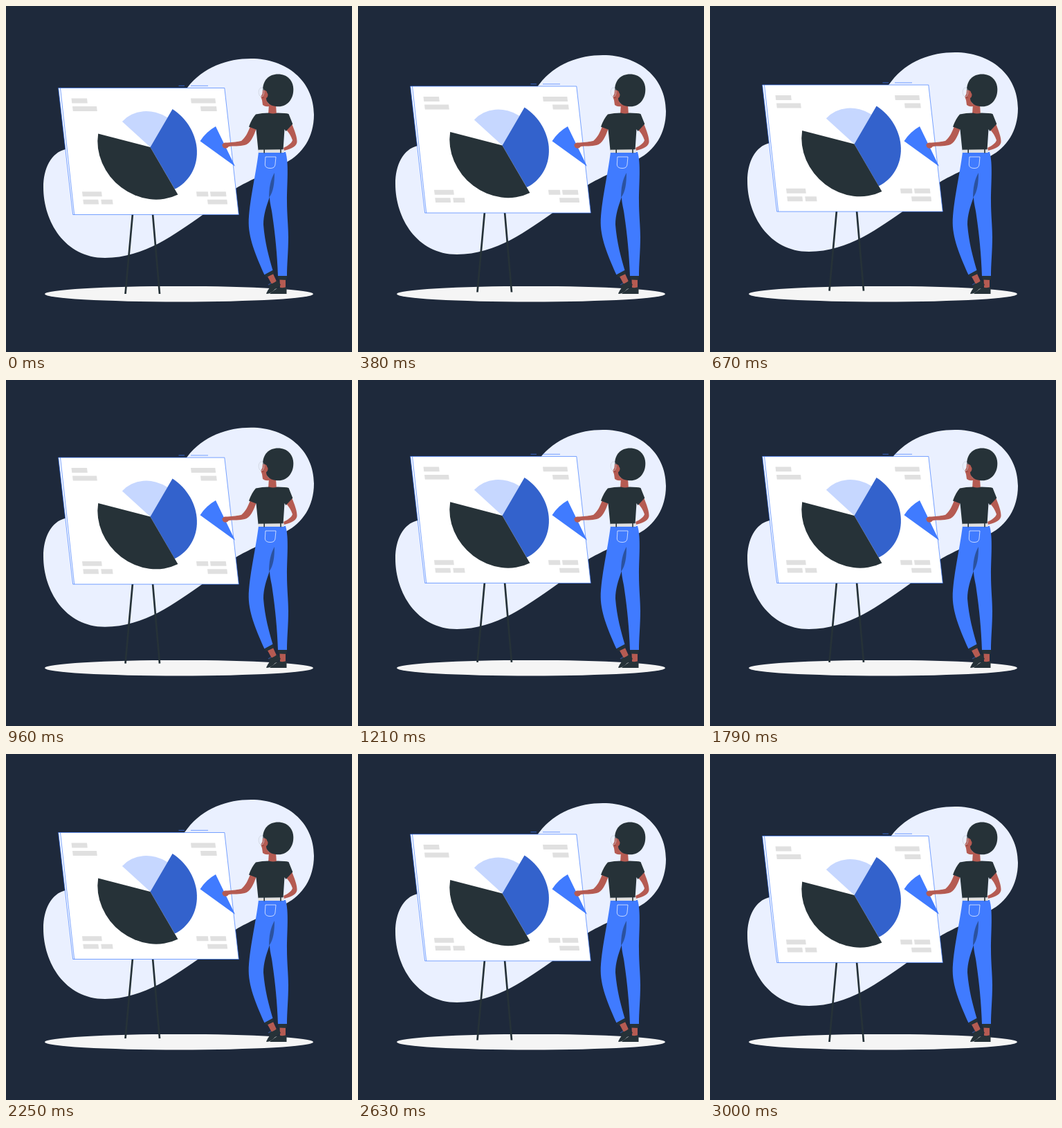
Recreate the animation shown at these times as an HTML page. Size 500 px wide and 500 px high, loop 3040 ms.

```html
<!DOCTYPE html>
<html lang="en">
<head>
<meta charset="utf-8">
<title>Presentation</title>
<style>
  html, body { margin: 0; width: 100%; height: 100%; overflow: hidden; background: #1e293b; }
  svg { display: block; width: 100%; height: 100%; }
  .ink { fill: #263238; }
  .skin { fill: #b55b52; }
  .blue { fill: #407bff; }
  .edge { fill: none; stroke: #407bff; stroke-width: .7; }
</style>
</head>
<body>
<svg viewBox="0 0 500 500">
  <path id="blob" fill="#eaf0ff" d="M262 118C285 88 320 76 354 76C405 76 445 108 445 157C445 190 428 214 405 226C375 242 348 254 333 263C315 275 300 291 284 302C245 329 200 364 143 364C85 364 54 311 54 262C54 235 65 212 86 207C130 195 200 215 236 160C245 146 251 131 262 118Z"/>
  <ellipse cx="250" cy="416.2" rx="194" ry="11.3" fill="#f5f5f5"/>

  <g id="board">
    <path d="M183 300L172.5 416M212 300L222 416" fill="none" stroke="#263238" stroke-width="2.7"/>
    <path class="edge" d="M249.5 115.3H258M267 115.3H292"/>
    <path d="M75.7 118.5H315.8L336.3 301.5H96.7Z" fill="#fff"/>
    <path class="edge" d="M75.7 118.5H315.8L336.3 301.5H96.7ZM78.5 118.5L98.7 301.5"/>
    <g id="labels" fill="#e0e0e0"></g>
    <g id="pie" transform="matrix(1 0 .112 1 208.5 204)"></g>
  </g>

  <path class="blue" d="M331 231.8L280.5 195.3A63 63 0 0 1 303 174Z"/>

  <g id="woman">
    <path class="skin" d="M380 141L390 143L391 157H379Z"/>
    <path class="ink" d="M371 122C371 107 380 98.5 393 98.5C407 98.5 415.3 108 415.3 121C415.3 135 406 145.3 394 145.3C386 145.3 380 143 376 137Z"/>
    <path class="skin" d="M371 121.5Q377 121 377.5 126C379 126 379 132 376 133C376 138 379 141 383 144Q376 147 371 143L370 136L368.2 131L370.5 127Z"/>
    <ellipse cx="369" cy="124.5" rx="3.8" ry="6.5" fill="none" stroke="#c9ced8" stroke-width=".7"/>
    <path d="M370 132.5H373" stroke="#8e3d38" stroke-width=".8"/>

    <path class="skin" d="M353 174L361.5 178C357 190 353 199 345 201C338 203 328 202 322 203C319 207 314 206 313 203C311 199 315 197 320 197.5C328 197 336 196 340 195C346 190 349 184 353 174Z"/>
    <path class="skin" d="M413 170C417 180 421 190 420.5 197C419 205 408 207 402 209L401 205C406 203 413 198 414 194C412 188 409 183 405 179Z"/>
    <path class="ink" d="M361 156.5Q370 154.5 380 154.5Q386 156.5 392 154.5Q404 154.5 408.5 156L414.3 170.5L404.5 181L402.5 178L400.5 208.5H364.5L361.5 178.5L351 174.5Q355 163 361 156.5Z"/>

    <path class="blue" d="M365 211H404C409 228 406 256 406 282C406 302 408 318 408 334C408 355 406 372 406 390.5H393C392 360 389 330 385 303C384 293 381 285 381 276C376 290 372 302 372 316C374 342 380 363 385.5 382L373.5 388.5C364 367 351 339 350.7 314C351 285 361 244 365 211Z"/>
    <path d="M388 241C388 254 387 268 380 277C380 264 382 251 388 241Z" fill="#2b529f"/>
    <path d="M364.5 207.8L401 207.3L402 212H364.5Z" fill="#e0e0e0"/>
    <path d="M373.2 207V212.5M397 207V212.5" stroke="#263238" stroke-width="1.6"/>
    <path d="M375 218H390L389 229Q388.5 234.5 382 234.5Q374.5 234.5 374.3 229Z" fill="none" stroke="#fff" stroke-width=".7"/>

    <path class="skin" d="M378 391L386 387L391 398L384 402ZM395.5 395H404V408H396Z"/>
    <path class="ink" d="M373.3 388.5L385.3 382L387 387L376 392ZM393 390H406.2L405 396L394 395.5Z"/>
    <path class="ink" d="M381 415.5L390 409L395 406.5Q400 408 405.5 406L405.5 416H382Z"/>
    <path class="ink" d="M376 415.5Q378 411 381 407L379 402L385 401Q389 400 392 396L397 403Q393 407 389 409Q383 416 377 416Z"/>
    <path d="M379 403L383 400.5" stroke="#33508c" stroke-width="1.3"/>
  </g>
</svg>
<script>
  const LOOP = 3040, FPS = 24;
  const $ = id => document.getElementById(id);

  const bars = [ // x, y, width
    [94.5, 133.5, 22.5], [96, 145, 35],
    [267, 133.5, 35.3], [281, 145, 23],
    [110, 268.3, 28], [111.3, 279.7, 22], [137.3, 279.7, 16.5],
    [275, 268.3, 16.8], [295, 268.3, 22.7], [291, 279.7, 28.3]
  ];
  $('labels').innerHTML = bars
    .map(([x, y, w]) => `<path d="M${x} ${y}h${w}l.8 6.9h${-w}z"/>`).join('');

  function wedge(radius, from, to, fill) {
    const point = deg => {
      const a = deg * Math.PI / 180;
      return `${radius * Math.cos(a)} ${radius * Math.sin(a)}`;
    };
    return `<path fill="${fill}" d="M0 0L${point(from)}A${radius} ${radius} 0 0 1 ${point(to)}Z"/>`;
  }
  $('pie').innerHTML =
    wedge(52, -134.5, -55.2, '#c6d7ff') +
    wedge(67, -55.2, 64.8, '#3362cc') +
    wedge(75.7, 64.8, 195, '#263238');

  // Linear rise of 10 units and back within one period.
  function floating(seconds, period) {
    const p = seconds / period % 1;
    return -10 * (1 - Math.abs(1 - 2 * p));
  }

  function render(ms) {
    const seconds = Math.floor((ms % LOOP + 5) * FPS / 1000) / FPS;
    $('board').setAttribute('transform', `translate(0 ${floating(seconds, 3)})`);
    $('blob').setAttribute('transform', `translate(0 ${floating(seconds, 1.5)})`);
  }

  const start = performance.now();
  function tick() {
    render(performance.now() - start);
    requestAnimationFrame(tick);
  }
  tick();
</script>
</body>
</html>
```
